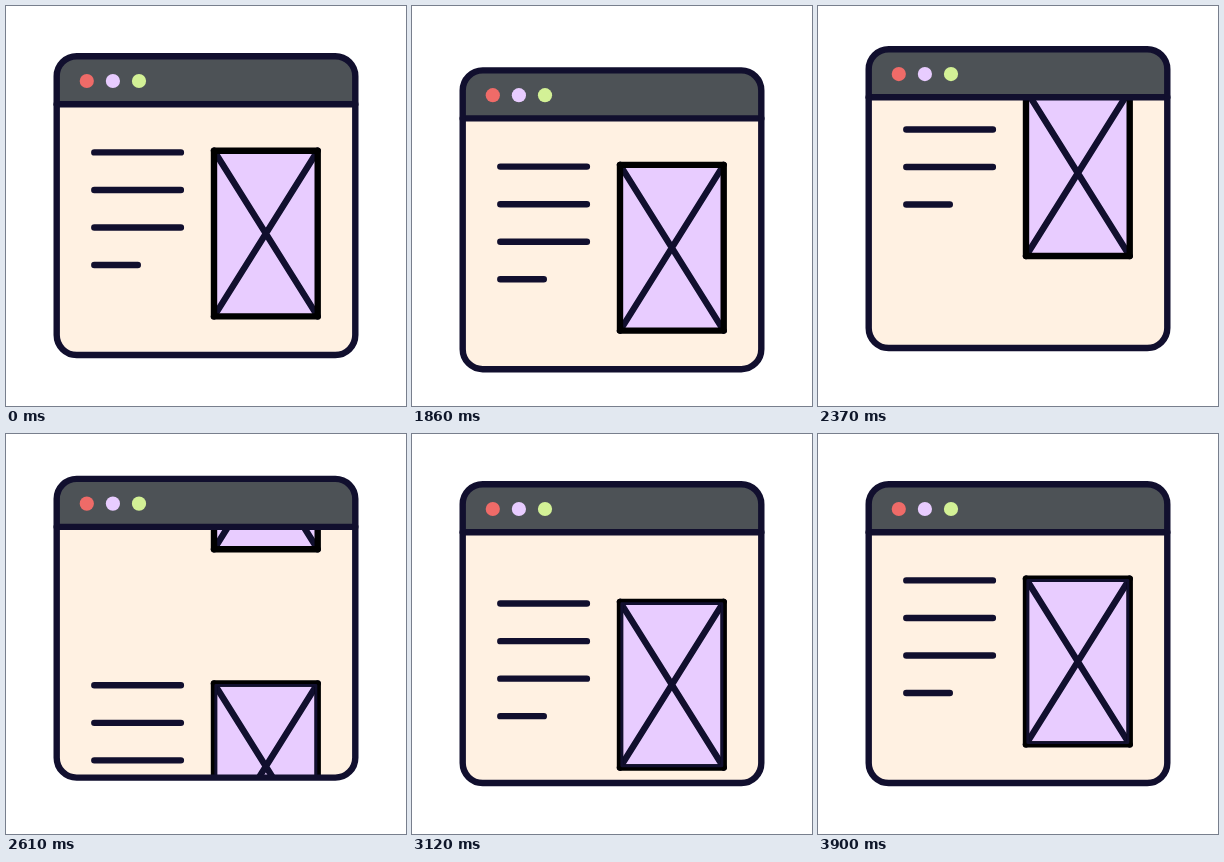
An HTML page for the animation above (3.93 s loop, 400 by 400 pixels).

```html
<!DOCTYPE html>
<html lang="en">
<head>
<meta charset="utf-8">
<title>Scrolling browser window</title>
<style>
  html, body { margin: 0; width: 100%; height: 100%; overflow: hidden; background: #fff; }
  svg { display: block; width: 100vw; height: 100vh; }
  .ink { fill: none; stroke: #110f2e; stroke-width: 6.4; stroke-linecap: round; stroke-linejoin: round; }
</style>
</head>
<body>
<svg viewBox="0 0 400 400">
  <defs>
    <clipPath id="frame"><rect x="50.7" y="50.2" width="298.6" height="298.8" rx="20"/></clipPath>
    <g id="content">
      <path class="ink" d="M88.3 146.4H174.9M88.3 184H174.9M88.3 221.5H174.9M88.3 259H131.8"/>
      <rect x="208" y="144.7" width="103.7" height="165.7" fill="#e8ccff"/>
      <path class="ink" d="M208 144.7L311.7 310.4M311.7 144.7L208 310.4"/>
      <rect class="ink" x="208" y="144.7" width="103.7" height="165.7" style="stroke:#000"/>
    </g>
  </defs>
  <g id="window">
    <g clip-path="url(#frame)">
      <rect x="47" y="47" width="306" height="306" fill="#fff1e2"/>
      <g id="page">
        <use href="#content"/>
        <g transform="translate(0 300)">
          <use href="#content"/>
          <rect class="ink" x="209.8" y="146.5" width="100.1" height="162.1" style="stroke-width:2.8"/>
        </g>
      </g>
      <rect x="47" y="47" width="306" height="51" fill="#4d5256"/>
    </g>
    <path class="ink" d="M50.7 98.2H349.3"/>
    <rect class="ink" x="50.7" y="50.2" width="298.6" height="298.8" rx="20"/>
    <circle cx="80.8" cy="75" r="7.1" fill="#ef6b68"/>
    <circle cx="106.9" cy="75" r="7.1" fill="#e8ccff"/>
    <circle cx="133" cy="75" r="7.1" fill="#d3f196"/>
  </g>
</svg>
<script>
const LOOP = 3930;
const byId = id => document.getElementById(id);

// Progress of cubic-bezier(x1, 0, x2, 1) between two times.
function ease(time, start, end, x1, x2) {
  const x = Math.min(1, Math.max(0, (time - start) / (end - start)));
  let low = 0, high = 1;
  for (let i = 0; i < 24; i++) {
    const s = (low + high) / 2, r = 1 - s;
    if (3 * s * r * r * x1 + 3 * s * s * r * x2 + s * s * s < x) low = s;
    else high = s;
  }
  return low * low * (3 - 2 * low);
}

function draw(now) {
  const t = now % LOOP;
  const windowY = 14.5 * ease(t, 1500, 1930, .33, .3)
    - 21.7 * ease(t, 1960, 2430, .5, .25)
    + 7.2 * ease(t, 2435, 2965, .33, .67);
  const pageY = -300 * ease(t, 1922, 3900, .48, 0);
  byId('window').setAttribute('transform', `translate(0 ${windowY.toFixed(3)})`);
  byId('page').setAttribute('transform', `translate(0 ${pageY.toFixed(3)})`);
}

let origin;
function tick(now) {
  origin ??= now;
  draw(now - origin);
  requestAnimationFrame(tick);
}
draw(0);
requestAnimationFrame(tick);
</script>
</body>
</html>
```
